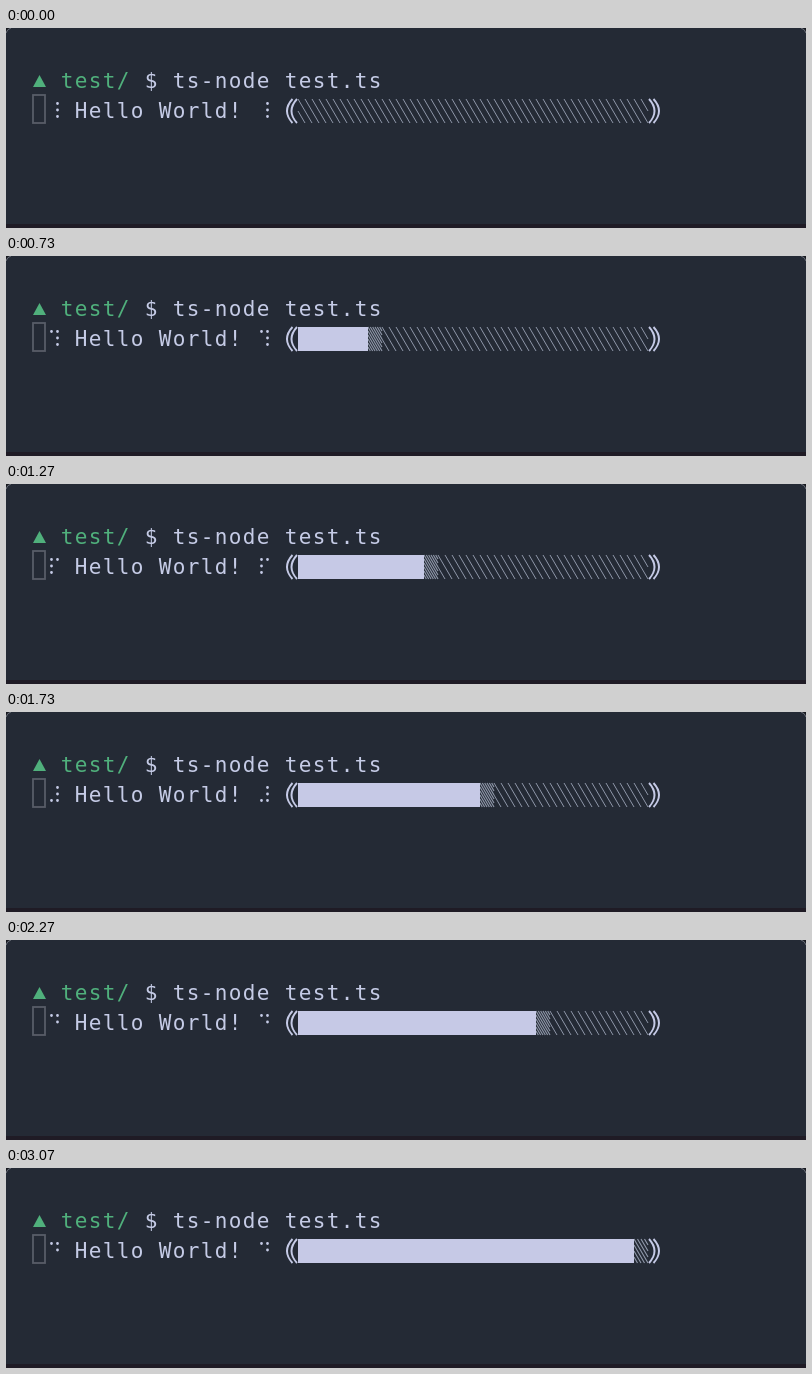
An HTML page for the animation above (3.14 s loop, 800 px wide and 200 px high).

```html
<!DOCTYPE html>
<html lang="en">
<head>
<meta charset="utf-8">
<title>Terminal progress bar</title>
<style>
  html, body { margin: 0; width: 100%; height: 100%; overflow: hidden; background: #242a35; }
  svg { display: block; }
  text { font: 21px "DejaVu Sans Mono", monospace; letter-spacing: 1.36px; white-space: pre; fill: #c5cbe6; }
  .green { fill: #50b07c; }
  .paren { fill: none; stroke: #c5cae6; stroke-width: 1.9; }
  .hatch { fill: none; stroke: #8f97a9; }
</style>
</head>
<body>
<svg width="800" height="200" viewBox="0 0 800 200">
  <path d="M0 0H5Q1 1 0 5ZM800 0H795Q799 1 800 5Z" fill="#17191f"/>
  <path d="M0 5Q1 1 5 0M800 5Q799 1 795 0" fill="none" stroke="#6b707a"/>
  <rect y="196" width="800" height="4" fill="#1f1b25"/>
  <path class="green" d="M27 59L33.5 47L40 59Z"/>
  <text class="green" x="54.7" y="60">test/</text>
  <text x="138.7" y="60">$ ts-node test.ts</text>
  <text x="68.7" y="90">Hello World!</text>
  <rect x="27" y="67" width="12" height="28" fill="none" stroke="#585d68" stroke-width="1.8"/>
  <path id="dots" fill="#c5cbe6"/>
  <path class="paren" d="M286.5 71Q275.5 83 286.5 95M291 71Q280 83 291 95"/>
  <path class="paren" d="M647.5 71Q658.5 83 647.5 95M643 71Q654 83 643 95"/>
  <path id="rest" class="hatch" stroke-width="1"/>
  <path id="edge" class="hatch" stroke-width="1.15"/>
  <rect id="fill" x="292" y="71" height="24" fill="#c6c9e6"/>
</svg>
<script>
const LOOP = 3140, CELL = 14, LEFT = 292, RIGHT = 642, TOP = 71, HEIGHT = 24;
const SPINNER = "⠋⠙⠹⠸⠼⠴⠦⠧⠇⠏";
const el = id => document.getElementById(id);
const dots = el("dots"), rest = el("rest"), edge = el("edge"), fill = el("fill");

// Parallel "\" strokes, cut off at both sides of the given span
function hatch(from, to, gap) {
  let d = "";
  for (let x = from - CELL + gap; x < to - 0.01; x += gap) {
    const a = Math.max(x, from), b = Math.min(x + CELL, to);
    const y = v => TOP + (v - x) * HEIGHT / CELL;
    d += `M${a} ${y(a)}L${b} ${y(b)}`;
  }
  return d;
}

// Raised dots of a braille character, drawn at both spinner columns
function braille(char) {
  const bits = char.charCodeAt(0) - 0x2800;
  let d = "";
  for (const left of [45.5, 255.5])
    for (let i = 0; i < 6; i++)
      if (bits >> i & 1) {
        const x = left + 6 * Math.floor(i / 3), y = 75.5 + 6.5 * (i % 3);
        d += `M${x - 1.4} ${y}a1.4 1.4 0 1 0 2.8 0a1.4 1.4 0 1 0 -2.8 0`;
      }
  return d;
}

function draw(step) {
  const progress = Math.max(0, 0.53 * step - 0.3);
  const full = Math.floor(progress), part = progress - full;
  const x = LEFT + full * CELL;
  const next = progress > 0 ? x + CELL : x;
  fill.setAttribute("width", x - LEFT);
  edge.setAttribute("d", next > x ? hatch(x, next, part < 0.3 ? 3.5 : 7 / 3) : "");
  rest.setAttribute("d", hatch(next, RIGHT, 7));
  dots.setAttribute("d", braille(SPINNER[Math.floor(step * 5 / 6 + 3.25) % 10]));
}

// 15 steps per second, with times rounded to 10 ms
function stepAt(t) {
  const r = t % 200;
  return Math.floor(t / 200) * 3 + (r >= 70) + (r >= 130);
}

const start = performance.now();
function tick() {
  draw(stepAt(Math.max(0, performance.now() - start) % LOOP));
  requestAnimationFrame(tick);
}
tick();
</script>
</body>
</html>
```
